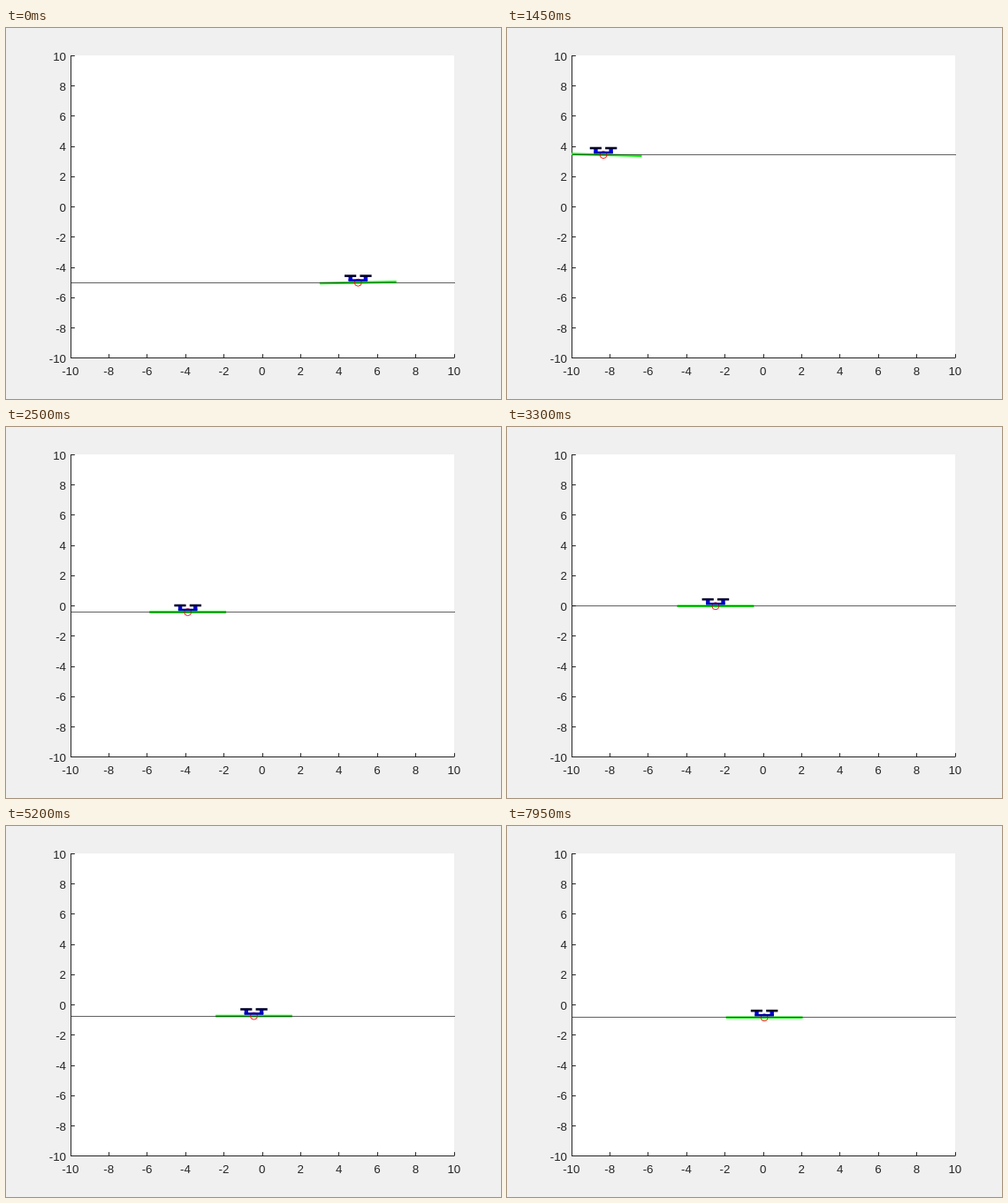
An HTML page with a canvas that plays this animation: 560 px wide and 420 px high, repeating every 8000 ms.

```html
<!DOCTYPE html>
<html lang="en">
<head>
<meta charset="utf-8">
<title>Drone flight plot</title>
<style>
  html, body { margin: 0; width: 100%; height: 100%; overflow: hidden; background: #f0f0f0; }
  canvas { display: block; width: 560px; height: 420px; }
</style>
</head>
<body>
<canvas id="stage" width="560" height="420"></canvas>
<script>
const ctx = document.getElementById('stage').getContext('2d');
const LOOP = 8000, STEP = 50;
const LEFT = 72.8, TOP = 31.5, WIDTH = 434, HEIGHT = 342.3;
const UNIT_X = WIDTH / 20, UNIT_Y = HEIGHT / 20;
const px = x => LEFT + (x + 10) * UNIT_X;
const py = y => TOP + (10 - y) * UNIT_Y;
const pixelX = x => Math.floor(x + 0.25) + 0.5;
const pixelY = y => Math.floor(y) + 0.5;

// Key points of the flight: the turns, and a slow settling
const path = [
  { t: 0, x: 5, y: -5 },
  { t: 1.2, x: -8.9, y: 4.6 },
  { t: 1.45, x: -8.33, y: 3.45 },
  { t: 2.15, x: -4.7, y: -0.74 },
  { t: 2.95, x: -3.1, y: 0.08 },
  { t: 4.3, x: -1.06, y: -0.53 },
  { t: 6, x: -0.13, y: -0.81 },
  { t: 8, x: 0.06, y: -0.825 }
];

const chord = (i, axis) => (path[i + 1][axis] - path[i][axis]) / (path[i + 1].t - path[i].t);

// Flat at turning points, harmonic mean of the neighbouring chords elsewhere
function slope(i, axis) {
  if (i === 0 || i === path.length - 1) return 0;
  const a = chord(i - 1, axis), b = chord(i, axis);
  return a * b > 0 ? 2 * a * b / (a + b) : 0;
}

function position(t, axis) {
  let i = 0;
  while (i < path.length - 2 && t > path[i + 1].t) i++;
  const a = path[i], b = path[i + 1], h = b.t - a.t;
  const u = (t - a.t) / h, v = 1 - u;
  return v * v * (1 + 2 * u) * a[axis] + u * u * (3 - 2 * u) * b[axis]
    + h * u * v * (v * slope(i, axis) - u * slope(i + 1, axis));
}

function stroke(x1, y1, x2, y2, color, width) {
  ctx.strokeStyle = color;
  ctx.lineWidth = width;
  ctx.beginPath();
  ctx.moveTo(x1, y1);
  ctx.lineTo(x2, y2);
  ctx.stroke();
}

function drawAxes() {
  const ink = '#262626', tickLength = WIDTH / 100;
  const axisX = pixelX(LEFT), axisY = pixelY(TOP + HEIGHT);
  stroke(axisX, 31, axisX, 374, ink, 1);
  stroke(73, axisY, 507, axisY, ink, 1);
  ctx.fillStyle = ink;
  ctx.font = '13.33px "Liberation Sans", Arial, sans-serif';
  for (let n = -10; n <= 10; n += 2) {
    const x = pixelX(px(n)), y = pixelY(py(n));
    stroke(x, axisY, x, axisY - tickLength, ink, 1);
    stroke(axisX, y, axisX + tickLength, y, ink, 1);
    ctx.textAlign = 'center';
    ctx.fillText(n, px(n), 393);
    ctx.textAlign = 'right';
    ctx.fillText(n, 68, Math.round(py(n)) + 5);
  }
}

function drawBody(x, y) {
  for (const side of [-1, 1]) {
    stroke(x + side * 8.6, y - 7.5, x + side * 8.6, y - 2, '#0000ee', 4.4);
    stroke(x + side * 2.1, y - 7.6, x + side * 15.3, y - 7.6, '#000028', 2.6);
  }
  stroke(x - 10.8, y - 2.6, x + 10.8, y - 2.6, '#0000a8', 2.6);
}

function draw(t) {
  const worldX = position(t, 'x');
  const x = px(worldX), y = py(position(t, 'y')), row = pixelY(y);
  const tilt = 0.0047 * worldX * Math.exp(-((t / 2) ** 6));
  const half = 2 * UNIT_X, rise = 2 * UNIT_Y * tilt;

  ctx.fillStyle = '#f0f0f0';
  ctx.fillRect(0, 0, 560, 420);
  ctx.fillStyle = '#fff';
  ctx.fillRect(73, 31, 434, 343);
  drawAxes();

  ctx.save();
  ctx.beginPath();
  ctx.rect(73, 31, 435, 343);
  ctx.clip();
  stroke(x - half, y + rise, x + half, y - rise, '#0f0', 2.67);
  stroke(74, row, 508, row, 'rgba(0,0,0,0.62)', 1);
  ctx.strokeStyle = '#f00';
  ctx.lineWidth = 0.9;
  ctx.beginPath();
  ctx.arc(x, y, 4, 0, 2 * Math.PI);
  ctx.stroke();
  drawBody(x, y);
  ctx.restore();
}

const start = performance.now();
function tick() {
  const time = (performance.now() - start) % LOOP;
  draw(Math.floor(time / STEP) * STEP / 1000);
  requestAnimationFrame(tick);
}
tick();
</script>
</body>
</html>
```
